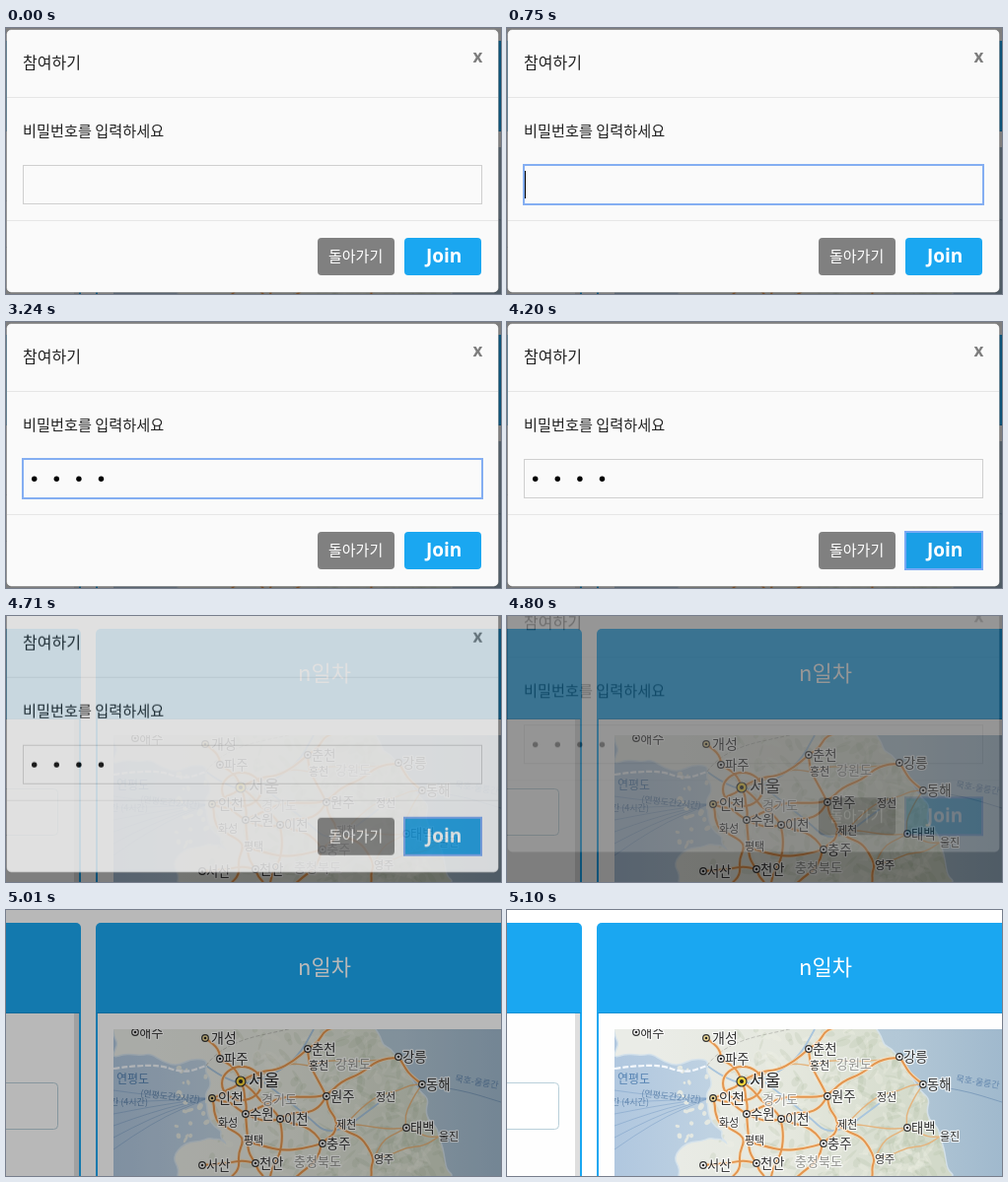
Animation of 502x270 px, one loop 5670 ms. Source, as an HTML page with a canvas:

```html
<!DOCTYPE html>
<html lang="ko">
<head>
<meta charset="utf-8">
<title>참여하기</title>
<style>
html, body { margin: 0; width: 100%; height: 100%; overflow: hidden; background: #fff; }
canvas { display: block; }
</style>
</head>
<body>
<canvas id="stage" width="502" height="270"></canvas>
<script>
const W = 502, H = 270, LOOP = 5670;
const FONT = '"Noto Sans CJK KR", "Noto Sans CJK", "Noto Sans CJK JP", sans-serif';
const LATIN = '"Noto Sans", sans-serif';
const BLUE = '#1aa7f1';

function makeLayer() {
  const layer = document.createElement('canvas');
  layer.width = W;
  layer.height = H;
  return layer;
}

function roundBox(c, x, y, w, h, r, fill, stroke) {
  c.beginPath();
  c.roundRect(x, y, w, h, r);
  if (fill) { c.fillStyle = fill; c.fill(); }
  if (stroke) { c.strokeStyle = stroke; c.lineWidth = 1; c.stroke(); }
}

function dot(c, x, y, r, fill) {
  c.beginPath();
  c.arc(x, y, r, 0, 7);
  c.fillStyle = fill;
  c.fill();
}

function write(c, text, x, y, size, color, weight = 400, font = FONT) {
  c.font = `${weight} ${size}px ${font}`;
  c.fillStyle = color;
  c.fillText(text, x, y);
}

function randomFrom(seed) {
  return () => (seed = (seed * 16807) % 2147483647) / 2147483647;
}

/* ---------- map ---------- */

// Coast corners, clockwise from the north-west; roughen() adds the detail.
const COAST = [[109, 121], [109, 149], [147, 145], [203, 151], [208, 176], [204, 195],
  [219, 224], [224, 239], [206, 232], [172, 248], [174, 272], [455, 272], [439, 232],
  [428, 192], [395, 149], [374, 121]];

const CITIES = {
  해주: [131, 124], 개성: [202, 130], 파주: [217, 151], 인천: [209, 191], 수원: [243, 207],
  이천: [278, 212], 춘천: [306, 141], 원주: [325, 189], 강릉: [398, 149], 동해: [422, 177],
  태백: [406, 221], 충주: [321, 237], 천안: [253, 257], 서산: [199, 259], 서울: [238, 174]
};
// Towns without a marker are placed by the left middle of the name.
const TOWNS = {
  홍천: [307, 158], 정선: [375, 190], 화성: [215, 216], 평택: [241, 234],
  제천: [335, 218], 영주: [373, 253], 울진: [439, 230]
};
const PROVINCES = { 경기도: [259, 192], 강원도: [334, 156], 충청북도: [292, 255] };
const PLACES = { ...CITIES, ...TOWNS, 남: [268, 285], 서: [219, 285], 동: [371, 285], 북: [346, 115] };

const HIGHWAYS = ['개성 파주 서울 수원 천안 남', '서울 춘천 북', '인천 서울', '수원 원주 강릉 동해',
  '인천 수원 이천 원주', '인천 화성 평택 서', '춘천 원주 제천 영주 동', '이천 충주 남',
  '평택 충주 제천', '서울 이천 남', '서산 천안'];
const BYROADS = ['춘천 홍천 강릉', '제천 정선 동해', '제천 태백 울진', '서울 홍천', '영주 태백 동해', '영주 울진'];

function roughen(points, amount, rand) {
  for (let pass = 0; pass < 2; pass++) {
    points = points.flatMap((p, i) => {
      const q = points[i + 1];
      if (!q) return [p];
      const bend = (rand() - 0.5) * amount;
      return [p, [(p[0] + q[0]) / 2 - (q[1] - p[1]) * bend, (p[1] + q[1]) / 2 + (q[0] - p[0]) * bend]];
    });
  }
  return points;
}

// Smooth curve through the midpoints of the given points.
function trace(c, points) {
  c.beginPath();
  c.moveTo(...points[0]);
  for (let i = 1; i < points.length - 1; i++) {
    const [x, y] = points[i], [nx, ny] = points[i + 1];
    c.quadraticCurveTo(x, y, (x + nx) / 2, (y + ny) / 2);
  }
  c.lineTo(...points.at(-1));
}

function line(c, points, color, width, dash = []) {
  trace(c, points);
  c.setLineDash(dash);
  c.strokeStyle = color;
  c.lineWidth = width;
  c.stroke();
  c.setLineDash([]);
}

function label(c, text, x, y, size, color, weight = 400) {
  const base = y + size * 0.37;
  c.font = `${weight} ${size}px ${FONT}`;
  c.lineWidth = 2.5;
  c.strokeStyle = 'rgba(255,255,255,.75)';
  c.strokeText(text, x, base);
  write(c, text, x, base, size, color, weight);
}

function marker(c, x, y, r, fill) {
  dot(c, x, y, r, fill);
  c.strokeStyle = '#333';
  c.lineWidth = 1.2;
  c.stroke();
  dot(c, x, y, r * 0.4, '#222');
}

function tiltedNote(c, text, x, y, angle) {
  c.save();
  c.translate(x, y);
  c.rotate(angle);
  write(c, text, 0, 0, 9, '#6387ae');
  c.restore();
}

function drawSea(c) {
  const sea = c.createLinearGradient(109, 0, W, 0);
  ['#b0c7df', '#bfd2e2', '#b9cddb', '#b2c7d6', '#a0b9cd'].forEach((color, i) => sea.addColorStop(i / 4, color));
  c.fillStyle = sea;
  c.fillRect(109, 121, W, H);
  for (let i = 0; i < 6; i++) {
    line(c, [[109, 183 + i * 12], [150, 189 + i * 5], [205, 191]], 'rgba(105,145,190,.5)', 0.8);
  }
  line(c, [[428, 178], [460, 182], [W, 195]], 'rgba(110,145,180,.7)', 1);
}

function drawLand(c, rand) {
  trace(c, roughen(COAST, 0.35, rand));
  c.closePath();
  c.strokeStyle = 'rgba(220,232,238,.8)';
  c.lineWidth = 3;
  c.stroke();
  c.save();
  const land = c.createLinearGradient(150, 0, 430, 0);
  ['#eaece7', '#e4e7dd', '#d2d9c9'].forEach((color, i) => land.addColorStop(i / 2, color));
  c.fillStyle = land;
  c.fill();
  c.clip();
  for (let i = 0; i < 420; i++) {
    const x = 190 + 260 * Math.sqrt(rand()), y = 121 + 150 * rand();
    c.fillStyle = rand() < 0.55 ? 'rgba(172,186,158,.22)' : 'rgba(240,240,228,.28)';
    c.beginPath();
    c.ellipse(x, y, 2 + 8 * rand(), 1 + 3 * rand(), rand() * 3, 0, 7);
    c.fill();
  }
  line(c, [[203, 158], [230, 178], [262, 173], [296, 150], [312, 121]], '#a9c5dd', 1.8);
  line(c, [[262, 175], [300, 204], [330, 232], [378, 196]], '#a9c5dd', 1.8);
  c.restore();
  for (let i = 0; i < 22; i++) {
    c.fillStyle = '#e4e8e2';
    c.beginPath();
    c.ellipse(172 + 32 * rand(), 160 + 78 * rand(), 1 + 3.5 * rand(), 1 + 2 * rand(), rand() * 3, 0, 7);
    c.fill();
  }
}

function drawRoads(c, rand) {
  const plan = routes => routes.map(r => roughen(r.split(' ').map(name => PLACES[name]), 0.3, rand));
  const highways = plan(HIGHWAYS);
  plan(BYROADS).forEach(p => line(c, p, '#e4b47e', 1.4));
  for (const [color, width] of [['#f6dfbd', 3.6], ['#e39650', 2]]) {
    highways.forEach(p => line(c, p, color, width));
    c.beginPath();
    c.ellipse(239, 176, 20, 17, 0, 0, 7);
    c.stroke();
  }
}

function drawNames(c) {
  write(c, '연평도', 112, 176, 12, '#5482b2');
  write(c, '간 (4시간)', 106, 198, 9, '#6387ae');
  tiltedNote(c, '(연평도간2시간)', 136, 189, 0.11);
  tiltedNote(c, '묵호-울릉간', 455, 174, 0.16);
  for (const [name, [x, y]] of Object.entries(PROVINCES)) label(c, name, x, y, 13, '#92938f');
  for (const [name, [x, y]] of Object.entries(TOWNS)) label(c, name, x, y, 11, '#303030');
  for (const [name, [x, y]] of Object.entries(CITIES)) {
    const capital = name === '서울';
    const large = name === '개성' || name === '인천';
    marker(c, x, y, capital ? 5 : 3.3, capital ? '#f5d33c' : large ? '#f3dd9a' : '#fff');
    if (capital) label(c, name, x + 8, y - 1, 17, '#222', 500);
    else label(c, name, x + (large ? 6 : 4), y, large ? 14 : 13.3, '#303030', large ? 500 : 400);
  }
}

function drawMap(c) {
  const rand = randomFrom(41);
  c.save();
  c.beginPath();
  c.rect(109, 121, W, H);
  c.clip();
  c.lineJoin = 'round';
  drawSea(c);
  drawLand(c, rand);
  line(c, [[109, 161], [150, 155], [180, 166], [203, 158]], '#f4f8fc', 2.2, [6, 2]);
  line(c, [[203, 158], [218, 136], [300, 118]], 'rgba(150,150,145,.5)', 1, [4, 2]);
  drawRoads(c, rand);
  drawNames(c);
  c.restore();
}

/* ---------- page and dialog ---------- */

function drawPage(c) {
  c.fillStyle = '#fff';
  c.fillRect(0, 0, W, H);
  roundBox(c, -20, 13, 96, 280, 5, BLUE);
  roundBox(c, 91, 13, 440, 280, 5, BLUE);
  c.fillStyle = '#1590d2';
  c.fillRect(0, 104, 75, 1);
  c.fillRect(92, 104, W, 1);
  c.fillStyle = '#fefefe';
  c.fillRect(0, 105, 74, H);
  c.fillRect(93, 105, W, H);
  c.fillStyle = '#dedede';
  c.fillRect(69, 105, 5, H);
  roundBox(c, -10, 175.5, 62.5, 47, 4, '#fff', '#b9d0da');
  write(c, 'n일차', 296, 66, 22, '#fff');
  drawMap(c);
}

function drawField(c, dots, focused, caret) {
  c.strokeStyle = focused ? '#84aef2' : '#cfcfcf';
  c.lineWidth = focused ? 2 : 1;
  if (focused) c.strokeRect(17, 139, 466, 40);
  else c.strokeRect(17.5, 139.5, 465, 39);
  for (let i = 0; i < dots; i++) dot(c, 28.7 + i * 22.6, 159.3, 2.7, '#000');
  c.fillStyle = '#000';
  if (caret) c.fillRect(18 + Math.round(dots * 22.5), 145, 1, 28);
}

function drawDialog(c, t) {
  const dots = [2070, 2310, 2610, 2730].filter(at => t >= at).length;
  const focused = t >= 750 && t < 4200;
  const caret = focused && !(t >= 1200 && t < 1710) && !(t >= 3240 && t < 3750);

  c.clearRect(0, 0, W, H);
  roundBox(c, 0.5, 1.5, 499, 267, 5, '#fafafa', 'rgba(0,0,0,.2)');
  c.fillStyle = '#e6e6e6';
  c.fillRect(1, 70, 498, 1);
  c.fillRect(1, 195, 498, 1);
  write(c, '참여하기', 17, 40.5, 16, '#222', 300);
  write(c, '비밀번호를 입력하세요', 17, 110, 15.2, '#222', 300);
  write(c, 'x', 473.5, 34.5, 17, '#7d7d7d', 700, LATIN);
  drawField(c, dots, focused, caret);
  roundBox(c, 316, 213, 78, 38, 4, '#808080');
  write(c, '돌아가기', 327, 237, 15, '#fff', 500);
  roundBox(c, 404, 213, 78, 38, 4, t >= 4200 ? '#1a9fe6' : BLUE);
  write(c, 'Join', 426, 238, 19, '#fff', 600, LATIN);
  if (t >= 4200) {
    c.strokeStyle = '#78a8f4';
    c.lineWidth = 2;
    c.strokeRect(404, 213, 78, 38);
  }
}

/* ---------- timing ---------- */

const clamp = v => Math.min(1, Math.max(0, v));

// cubic-bezier(0, 0, .58, 1)
function easeOut(x) {
  let low = 0, high = 1;
  for (let i = 0; i < 20; i++) {
    const s = (low + high) / 2;
    if (1.74 * s * s * (1 - s) + s ** 3 < x) low = s; else high = s;
  }
  return 3 * low * low * (1 - low) + low ** 3;
}

const view = document.getElementById('stage').getContext('2d');
const page = makeLayer(), dialog = makeLayer();
drawPage(page.getContext('2d'));

function render(t) {
  const closing = t < 4710 ? 0 : t - 4680;
  const shade = 0.5 * (1 - clamp((t - 4945) / 150));
  view.globalAlpha = 1;
  view.drawImage(page, 0, 0);
  view.fillStyle = `rgba(0,0,0,${shade})`;
  view.fillRect(0, 0, W, H);
  if (closing < 150) {
    drawDialog(dialog.getContext('2d'), t);
    view.globalAlpha = 1 - closing / 150;
    view.drawImage(dialog, 0, -50 * easeOut(closing / 300));
  }
}

const start = performance.now();
function tick() {
  render((performance.now() - start) % LOOP);
  requestAnimationFrame(tick);
}
tick();
</script>
</body>
</html>
```
